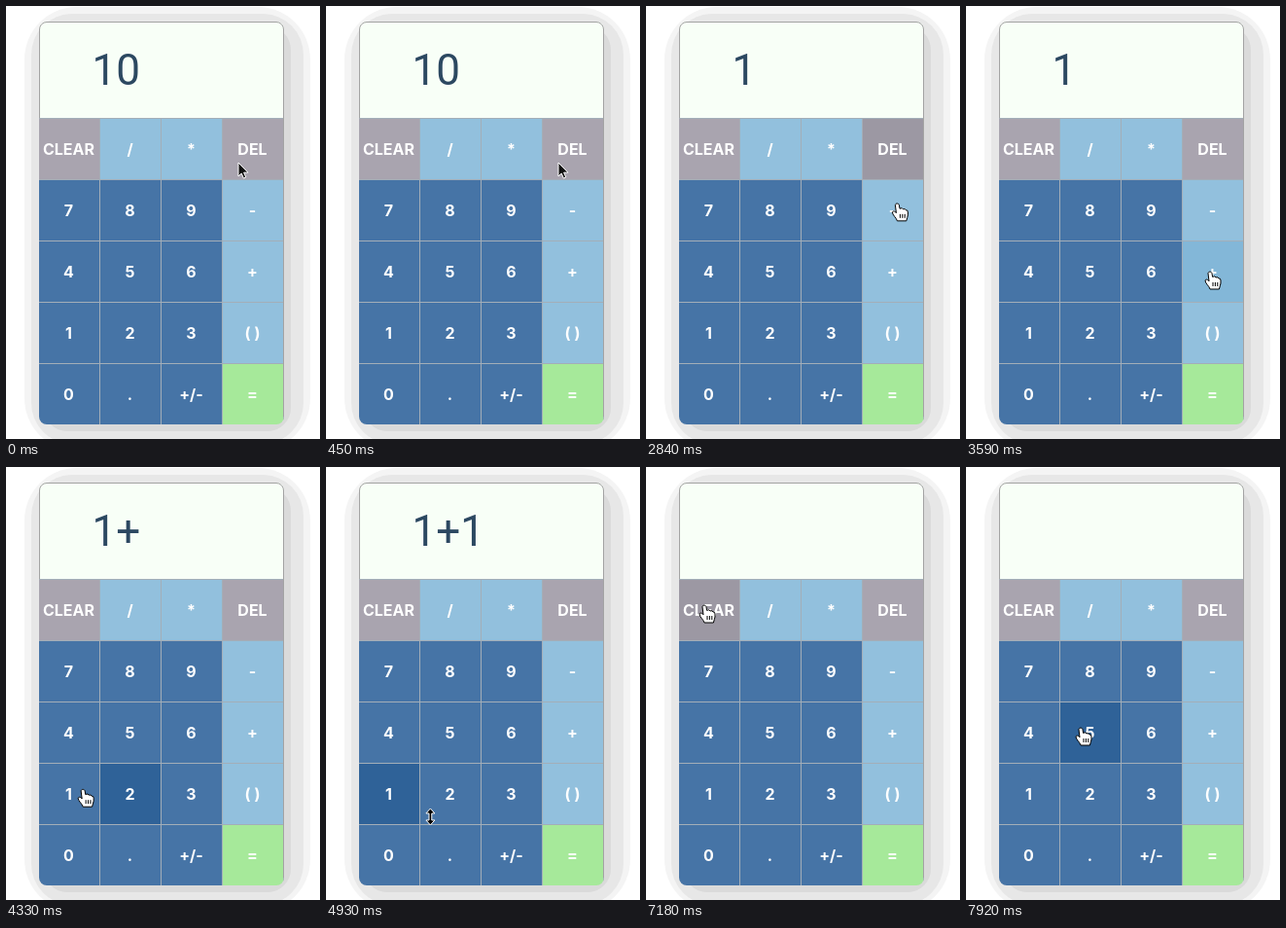
Animation, 323 px wide and 445 px high, one loop 8 s. Source, as an HTML page:

```html
<!DOCTYPE html>
<html lang="en">
<head>
<meta charset="utf-8">
<title>Calculator</title>
<style>
  html, body { margin: 0; width: 100%; height: 100%; overflow: hidden; background: #fff; }
  svg { display: block; }
  .key { font: 700 16px Inter, "Open Sans", sans-serif; fill: #fff; text-anchor: middle; }
  #display { font: 44px Roboto, "Liberation Sans", sans-serif; fill: #2c4861; }
</style>
</head>
<body>
<svg width="323" height="445" viewBox="0 0 323 445">
  <defs><clipPath id="body"><rect x="34" y="16" width="252" height="414" rx="8"/></clipPath></defs>
  <rect x="19" y="1" width="294" height="456" rx="54" fill="#f4f4f4"/>
  <rect x="26" y="8" width="280" height="442" rx="42" fill="#e7e7e7"/>
  <rect x="39" y="21" width="254" height="416" rx="24" fill="#dadada"/>
  <g clip-path="url(#body)">
    <rect x="34" y="16" width="252" height="100" fill="#f8fff7"/>
    <g id="keys"></g>
    <g id="lines" stroke="#a3aeb8"></g>
  </g>
  <path d="M34.5 115V24A7.5 7.5 0 0 1 42 16.5H278A7.5 7.5 0 0 1 285.5 24V422" fill="none" stroke="#a3a3a3"/>
  <g id="labels"></g>
  <text id="display" x="88.5" y="80.5"></text>
  <path id="cursor" stroke-linejoin="round"/>
</svg>
<script>
const LOOP = 8000, TICK = 149.4, CELL = 63, LEFT = 34, TOP = 115;
const $ = id => document.getElementById(id);

// normal and hovered fill of each kind of key
const fills = {
  grey: ["#a9a4af", "#9c98a3"],
  light: ["#92c0dd", "#83b7d8"],
  blue: ["#4674a6", "#2f6298"],
  green: ["#a6e99a", "#a1e694"]
};
const labels = ["CLEAR", "/", "*", "DEL", "7", "8", "9", "-", "4", "5", "6", "+",
  "1", "2", "3", "( )", "0", ".", "+/-", "="];

const kindOf = (label, i) =>
  label === "=" ? "green" : /[A-Z]/.test(label) ? "grey" : i < 4 || i % 4 === 3 ? "light" : "blue";

function add(parent, tag, attrs, text = "") {
  const el = document.createElementNS("http://www.w3.org/2000/svg", tag);
  for (const name in attrs) el.setAttribute(name, attrs[name]);
  el.textContent = text;
  return parent.appendChild(el);
}

const keys = labels.map((label, i) => {
  const x = LEFT + CELL * (i % 4), y = TOP + CELL * Math.floor(i / 4);
  add($("labels"), "text", { class: "key", x: x + 30.5, y: y + 38 }, label);
  const rect = add($("keys"), "rect", { x, y, width: CELL, height: CELL });
  return { rect, colors: fills[kindOf(label, i)] };
});

for (let i = 0; i < 5; i++) {
  const x = LEFT - 0.5 + CELL * i, y = TOP + 0.5 + CELL * i - (i ? 1 : 0) + (i ? 0 : 0);
  if (i) add($("lines"), "path", { d: `M${x} ${TOP}V430` });
  add($("lines"), "path", { d: `M${LEFT} ${y + (i ? 1 : 0)}H286` });
}

// each shape has its hot spot at 0,0
const cursors = {
  arrow: { d: "M0 0V14L3.2 11L5.4 16L7.8 15L5.6 10.2H10Z", fill: "#111", stroke: "#fff" },
  hand: {
    d: "M-3 1.8C-3-.4 .8-.4 1 1.8L1.6 5.4Q4.4 3.8 5 6Q7.4 5 8 7Q10 6.6 10 9V12Q9.4 14.5 8.4 18H-1" +
      "C-1.6 15-6 12-6 9C-5 7.2-3 8.4-2 9.8ZM2 11V15M4.4 11V15M6.8 11V15",
    fill: "#fff", stroke: "#000"
  },
  resize: { d: "M0-8.5L4.5-3.5H1.4V3.5H4.5L0 8.5L-4.5 3.5H-1.4V-3.5H-4.5Z", fill: "#000", stroke: "#fff" }
};

// the pointer's visits to keys, in ticks; bow bends the way there up or down
const start = { x: 239, y: 161 };
const visits = [
  { leave: 8, arrive: 12, x: 262, y: 147, bow: 30, press: 15, shows: "1" },
  { leave: 18, arrive: 24, x: 252, y: 273, bow: 93, press: 26, shows: "1+" },
  { leave: 26, arrive: 30, x: 66, y: 336, bow: 0, press: 32, shows: "1+1" },
  { leave: 32, arrive: 39, x: 252, y: 395, bow: 55, press: 39, shows: "2" },
  { leave: 41, arrive: 46, x: 61, y: 142, bow: -120, press: 48, shows: "" },
  { leave: 49, arrive: 53, x: 119, y: 268, bow: 0 }
];
const RESIZE_TICK = 33;

function pointerAt(tick) {
  const i = visits.findLastIndex(v => v.leave < tick);
  if (i < 0) return { ...start, shape: "arrow" };
  const to = visits[i], from = visits[i - 1] || start;
  const p = Math.min(1, (tick - to.leave) / (to.arrive - to.leave));
  const eased = Math.sin(p * Math.PI / 2);
  return {
    x: from.x + (to.x - from.x) * eased,
    y: from.y + (to.y - from.y) * eased + to.bow * Math.sin(p * Math.PI) ** 2,
    shape: tick === RESIZE_TICK ? "resize" : "hand"
  };
}

function keyAt({ x, y, shape }) {
  if (shape === "arrow" || y < TOP) return -1;
  return Math.floor((x - LEFT) / CELL) + 4 * Math.floor((y - TOP) / CELL);
}

function draw(now) {
  const tick = Math.floor((now % LOOP + 4) / TICK);
  const { x, y, shape } = pointerAt(tick);
  // the highlight follows the pointer one tick late
  const hovered = keyAt(pointerAt(tick - 1));
  keys.forEach(({ rect, colors }, k) => rect.setAttribute("fill", colors[+(k === hovered)]));
  const pressed = visits.findLast(v => v.press <= tick);
  $("display").textContent = pressed ? pressed.shows : "10";
  const look = { ...cursors[shape], transform: `translate(${x} ${y})` };
  for (const name in look) $("cursor").setAttribute(name, look[name]);
  requestAnimationFrame(draw);
}
draw(0);
</script>
</body>
</html>
```
